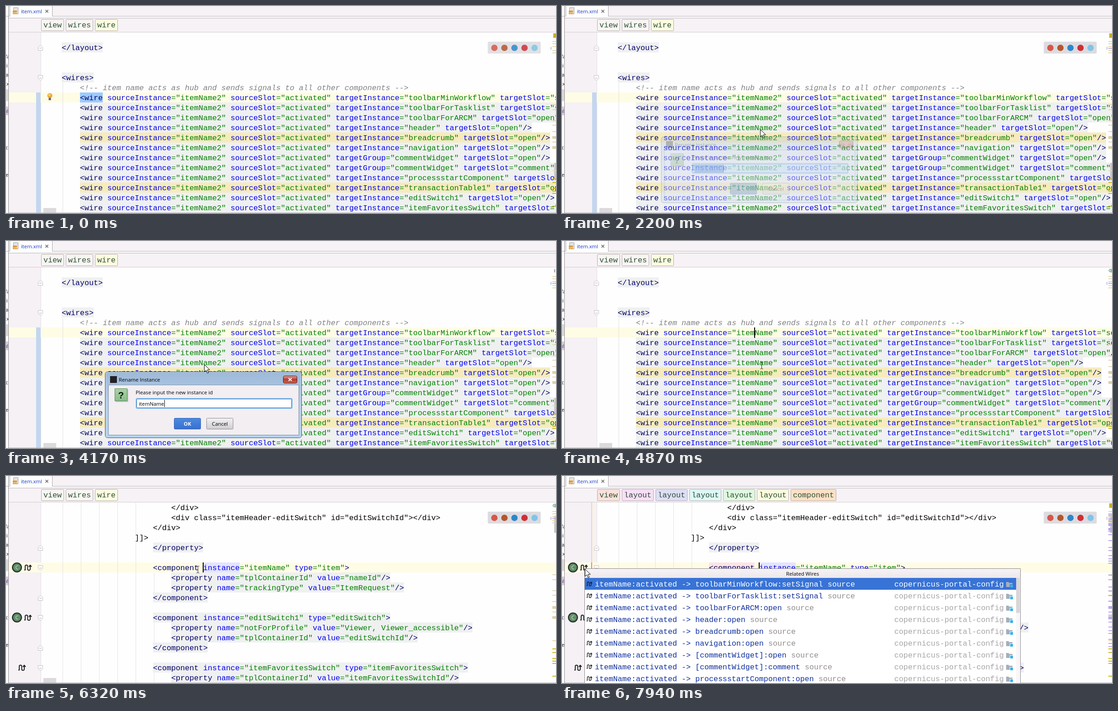
Recreate the animation shown at these times as an HTML page with a canvas. Size 1205 by 455 pixels, loop 8000 ms.

```html
<!DOCTYPE html>
<html lang="en">
<head>
<meta charset="utf-8">
<title>Rename instance</title>
<style>
html, body { margin: 0; width: 100%; height: 100%; overflow: hidden; background: #fefefe; }
canvas { display: block; }
</style>
</head>
<body>
<canvas id="stage" width="1205" height="455"></canvas>
<script>
const W = 1205, H = 455, LOOP = 8000, CHAR = 10, LINE = 22;
const c = document.getElementById('stage').getContext('2d');
const MONO = '16.667px "Liberation Mono", monospace';
const SANS = '11.3px "Open Sans", sans-serif';

const WIRES = [
  ['Instance', 'toolbarMinWorkflow', 'setSignal'], ['Instance', 'toolbarForTasklist', 'setSignal'],
  ['Instance', 'toolbarForARCM', 'open'], ['Instance', 'header', 'open'],
  ['Instance', 'breadcrumb', 'open'], ['Instance', 'navigation', 'open'],
  ['Group', 'commentWidget', 'open'], ['Group', 'commentWidget', 'comment'],
  ['Instance', 'processstartComponent', 'open'], ['Instance', 'transactionTable1', 'open'],
  ['Instance', 'editSwitch1', 'open'], ['Instance', 'itemFavoritesSwitch', 'open']
];

// [x, middle of line, markup]
const COMPONENTS = [
  [322, 158, '</property>'],
  [322, 202, '<component instance="itemName" type="item">'],
  [362, 224, '<property name="tplContainerId" value="nameId"/>'],
  [362, 246, '<property name="trackingType" value="ItemRequest"/>'],
  [322, 268, '</component>'],
  [322, 312, '<component instance="editSwitch1" type="editSwitch">'],
  [362, 334, '<property name="notForProfile" value="Viewer, Viewer_accessible"/>'],
  [362, 356, '<property name="tplContainerId" value="editSwitchId"/>'],
  [322, 378, '</component>'],
  [322, 422, '<component instance="itemFavoritesSwitch" type="itemFavoritesSwitch">'],
  [362, 444, '<property name="tplContainerId" value="itemFavoritesSwitchId"/>']
];

// [time, x, y] of the mouse
const MOUSE = [
  [0, -50, -50], [540, 925, 438], [700, 520, 290], [780, 396, 231], [940, 407, 217], [1020, 415, 207],
  [1180, 420, 205], [1420, 426, 225], [1500, 433, 244], [1730, 436, 262], [1810, 437, 273],
  [2200, 434, 271], [4640, 437, 273], [5300, 436, 271], [5530, 435, 256], [5610, 433, 240],
  [5770, 428, 225], [5850, 422, 210], [5930, 420, 205], [6580, 414, 206], [6720, 401, 209],
  [6870, 380, 218], [6950, 362, 223], [7110, 220, 220], [7190, 130, 216], [7270, 80, 214],
  [7350, 49, 212], [7510, 45, 206], [7670, 50, 204]
];

const step = (t, start, end, n) =>
  t < start ? 0 : t >= end ? 1 : (Math.floor((t - start) / (end - start) * (n - 1)) + 1) / n;

function rect(x, y, w, h, fill) {
  c.fillStyle = fill;
  c.fillRect(x, y, w, h);
}

function box(x, y, w, h, fill, border, radius = 0) {
  c.beginPath();
  c.roundRect(x + .5, y + .5, w - 1, h - 1, radius);
  c.fillStyle = fill;
  c.fill();
  if (border) stroke(border, 1);
}

function stroke(color, width) {
  c.strokeStyle = color;
  c.lineWidth = width;
  c.stroke();
}

function disc(x, y, r, fill) {
  c.beginPath();
  c.arc(x, y, r, 0, 7);
  c.fillStyle = fill;
  c.fill();
}

function gradient(y, h, ...colors) {
  const g = c.createLinearGradient(0, y, 0, y + h);
  colors.forEach((color, i) => g.addColorStop(i / (colors.length - 1), color));
  return g;
}

function text(s, x, baseline, color, font = MONO, align = 'left') {
  c.font = font;
  c.fillStyle = color;
  c.textAlign = align;
  c.fillText(s, x, baseline);
}

function path(d, x, y, scale, draw) {
  c.save();
  c.translate(x, y);
  c.scale(scale, scale);
  draw(new Path2D(d));
  c.restore();
}

function markup(s, x, mid) {
  for (const m of s.matchAll(/(<\/?\w+)|([\w-]+(?==))|(="[^"]*")|[^\s"]/g)) {
    const color = m[1] ? '#000068' : m[2] ? '#0000f0' : m[3] ? '#008000' : '#000068';
    text(m[0], x + m.index * CHAR, mid + 5, color);
  }
}

function tagLine(s, x, mid, back = '#eff0f0') {
  if (back) rect(x, mid - 12, s.length * CHAR, LINE, back);
  markup(s, x, mid);
}

function fold(mid, closes) {
  path(closes ? 'M0 11V4L5 0L10 4V11Z' : 'M0 0V7L5 11L10 7V0Z', 70.5, mid - 5.5, 1, p => {
    c.fillStyle = '#fff';
    c.fill(p);
    c.strokeStyle = '#c4c0c4';
    c.lineWidth = 1;
    c.stroke(p);
  });
  rect(73, mid, 5, 1, '#b0acb0');
}

function wireIcon(x, y, scale, color = '#222') {
  path('M0 12H2V4A2.5 2.5 0 0 1 7.5 4V10A2.5 2.5 0 0 0 13 10V2M10 5L13 1.5L16 5', x, y, scale, p => {
    c.strokeStyle = color;
    c.lineWidth = 2;
    c.stroke(p);
  });
}

function classIcon(mid) {
  disc(24, mid, 11, '#2c302c');
  disc(24, mid, 8.5, '#5f8f68');
  text('C', 24, mid + 4, '#e0ece0', '11px "Open Sans", sans-serif', 'center');
}

function bulb() {
  disc(96, 197, 5.5, '#eaa93a');
  disc(95, 195.5, 2.5, '#f8cf80');
  rect(93.5, 202, 5, 5, '#6c6458');
}

function frameChrome(t) {
  rect(0, 0, W, H, '#fefefe');
  rect(6, 0, W, 22, '#f7f2f6');
  rect(6, 27, W, 30, '#f7f2f6');
  rect(6, 58, 70, H, '#f6f1f5');
  rect(76, 58, 1, H, '#e2dee2');
  rect(0, 22, W, 1, '#b4b0b4');
  rect(6, 26, W, 1, '#b8b4b8');
  rect(6, 57, W, 1, '#d0ccd0');

  box(8, -3, 94, 26, '#fefefe', '#a8a4a8');
  rect(9, 22, 92, 1, '#fefefe');
  box(16, 3, 11, 15, '#e4e2e4', '#a0a0a8');
  rect(15, 10, 9, 8, '#d99a3c');
  text('</>', 15.5, 16.5, '#fff', 'bold 6px "Open Sans", sans-serif');
  text('item.xml', 33, 16, '#1638c8', SANS);
  c.beginPath();
  c.moveTo(86.5, 8.5); c.lineTo(92.5, 14.5);
  c.moveTo(92.5, 8.5); c.lineTo(86.5, 14.5);
  stroke('#686468', 1.6);

  // sliver of the project panel
  rect(0, 0, 5, H, '#fefefe');
  rect(0, 22, 5, 1, '#b4b0b4');
  rect(0, 183, 5, 26, '#dcdadc');
  rect(0, 221, 5, 19, '#d4d0d4');
  c.save();
  c.beginPath();
  c.rect(0, 0, 5, H);
  c.clip();
  [['fa', 115], ['li', 135], ['a', 155], ['.x', 175], ['ult', 235], ['c', 315], ['e', 375]].forEach(([s, y]) =>
    text(s, s === 'ult' ? -5 : s.length > 1 ? -2 : -1, y, s === 'ult' ? '#7030a0' : '#222', SANS));
  c.restore();
  rect(5, 0, 1, H, '#908c90');

  const crumbs = t < 6580
    ? [['view', '#f8f5f3'], ['wires', '#f8f5f3'], ['wire', '#fdfce0']]
    : [['view', '#fbe1db'], ['layout', '#f8def8'], ['layout', '#dedef6'], ['layout', '#def7f7'],
       ['layout', '#e0f8e0'], ['layout', '#fbfade'], ['component', '#fee0c5']];
  let x = 77;
  for (const [name, fill] of crumbs) {
    const w = name.length * CHAR + 10;
    box(x, 29, w, 26, fill, '#b4aca8', 1);
    text(name, x + 5, 47, '#2c5034');
    x += w + 4;
  }
}

function wiresView(t) {
  const renamed = t >= 4870;
  rect(124, 169, 1, H, '#e0e0e0');
  if (!renamed) rect(66, 190, 10, H, '#c3d6ef');
  fold(92, true);
  fold(158, false);
  tagLine('</layout>', 122, 92);
  tagLine('<wires>', 122, 158);
  text('<!-- item name acts as hub and sends signals to all other components -->', 162, 185, '#808080', 'italic ' + MONO);
  WIRES.forEach(([kind, target, slot], i) => {
    const line = `<wire sourceInstance="itemName${renamed ? '' : 2}" sourceSlot="activated" ` +
      `target${kind}="${target}" targetSlot="${slot}"/>`;
    if (!i && t < 1730) rect(162, 190, 50, LINE, '#9ccbff');
    tagLine(line, 162, 202 + i * LINE, !i ? null : i === 4 || i === 9 ? '#f6ebbc' : undefined);
  });
  if (t < 1180 || t >= 5770) bulb();
  if (t >= 1180 && t < 2200 || renamed) rect(421, 190, 2, 23, '#000');
}

function componentsView(t) {
  for (let x = 124; x <= 284; x += 40) rect(x, 58, 1, x === 284 ? 70 : H, '#e4e4e4');
  rect(284, 147, 1, H, '#e4e4e4');
  [[212, 44], [322, 44], [432, 22]].forEach(([y, h]) => rect(324, y, 1, h, '#e4e4e4'));
  if (t >= 7110) {
    rect(64, 58, 2, H, '#f0dc8c');
    rect(64, 190, 2, 22, '#e88070');
  }
  [158, 268, 378].forEach(y => fold(y, true));
  [202, 312, 422].forEach(y => fold(y, false));
  classIcon(201);
  classIcon(311);
  wireIcon(40, 194.5, 1);
  wireIcon(40, 304.5, 1);
  wireIcon(27, 414.5, 1);
  [['</div>', 362, 70], ['<div class="itemHeader-editSwitch" id="editSwitchId"></div>', 362, 92],
   ['</div>', 322, 114], [']]>', 282, 136]].forEach(([s, x, mid]) => text(s, x, mid + 5, '#000'));
  if (t >= 6580) rect(322, 190, 100, LINE, '#fde4e4');
  rect(432, 190, 80, LINE, '#e4e4ff');
  COMPONENTS.forEach(([x, mid, s]) => tagLine(s, x, mid, mid === 202 ? null : undefined));
  rect(431, 190, 2, LINE, '#000');
}

function errorStripe(t) {
  const marks = (ys, color, h = 2) => ys.forEach(y => rect(1197, y, 8, h, color));
  rect(1201, t < 6260 ? 345 : 87, 4, 38, '#c8c6ca');
  rect(1193, 90, 2, 6, '#b4c6e4');
  marks([77, 82, 88, 97, 102, 216, 227, 251, 261, 275, 298, 361], '#e6d8b0');
  marks([286, 308], '#e0d0a4', 6);
  if (t >= 1730) marks([92], '#c0a8e8');
  if (t >= 7110) {
    marks([83, 86, 92, 95, 99, 121, 128, 141, 156, 163, 174, 181, 186, 191, 217, 227, 243, 252, 262, 274,
      298, 305, 320, 331, 339, 345, 358, 367, 374], '#b8a8f4');
    marks([104, 114, 286, 309], '#b8a8f4', 6);
  }
  marks([379, 387, 400, 406, 411, 439], '#d0b818');
  if (t < 3440 || t >= 7110) rect(1199, 60, 6, 10, '#d0b010');
  else if (t < 4870) rect(1201, 62, 2, 7, '#989498');
  else {
    c.beginPath();
    c.ellipse(1203, 65, 4.5, 3, 0, 0, 7);
    stroke('#5aa07c', 1.5);
    disc(1203, 65, 1.5, '#4a906c');
  }
}

function browserBar(t) {
  c.globalAlpha =
    t < 1180 ? .85 - .65 * step(t, 70, 310, 4) :
    t < 1420 ? .35 :
    t < 3440 ? .35 + .65 * step(t, 1420, 1500, 2) :
    t < 5770 ? 1 - step(t, 3440, 3840, 5) :
    .5 * step(t, 5770, 6010, 4) + .5 * step(t, 6260, 6320, 2);
  box(1055, 78, 117, 27, '#dddbdf', null, 2);
  ['#d4584a', '#b4562e', '#2f86cc', '#cc3038', '#80c4e8'].forEach((color, i) => disc(1070 + i * 22, 92, 7, color));
  c.globalAlpha = 1;
}

function dialog(t) {
  c.globalAlpha = step(t, 2200, 2440, 4) - step(t, 4560, 4640, 2);
  box(217, 287, 431, 146, gradient(287, 146, '#9db9d8', '#b6cfe9', '#b4d0ee'), '#38444f', 5);
  box(218, 288, 429, 144, 'rgba(0,0,0,0)', '#d4e4f4', 4);
  box(224, 316, 418, 111, '#f2eef2', '#8094a8');
  rect(228, 297, 15, 15, '#222026');
  text('Rename Instance', 247, 309, '#000', SANS);

  box(607, 296, 31, 17, gradient(296, 17, '#e0a8a0', '#b83c34', '#c86850'), '#501c20', 3);
  c.beginPath();
  c.moveTo(619, 301.5); c.lineTo(626, 307.5);
  c.moveTo(626, 301.5); c.lineTo(619, 307.5);
  stroke('#fff', 2.2);

  rect(240, 326, 28, 28, '#c8c8c8');
  box(238, 324, 28, 28, gradient(324, 28, '#a8d4a4', '#88bc88'), '#5c8860');
  text('?', 252, 346, '#101810', 'bold 21px "Liberation Sans", sans-serif', 'center');
  text('Please input the new instance id', 284, 337, '#000', SANS);

  box(284, 345, 344, 24, '#74aee4', '#a4ccf0', 3);
  box(286, 347, 340, 20, '#fff', '#4c88c4', 1);
  const selected = t < 3440, value = t < 4170 ? 'itemName2' : 'itemName';
  if (selected) rect(290, 349, 64, 17, '#3a74c8');
  text(value, 291, 362, selected ? '#fff' : '#000', SANS);
  const caretOn = t < 2900 || t >= 3440 && t < 4020 || t >= 4170;
  if (caretOn) rect(t < 4170 ? 353 : 347, 349, 1, 16, '#000');

  box(368, 389, 59, 25, gradient(389, 25, '#4c8ae0', '#386fd0'), '#3464b4', 2);
  text('OK', 397.5, 406, '#fff', 'bold ' + SANS, 'center');
  box(439, 389, 59, 25, gradient(389, 25, '#f4f2f4', '#cfcdcf'), '#8c8a8c', 2);
  text('Cancel', 468.5, 406, '#000', SANS, 'center');
  c.globalAlpha = 1;
}

function relatedWires() {
  box(49, 203, 956, 260, '#fff', '#8c888c');
  rect(50, 204, 954, 20, gradient(204, 20, '#f6f2f6', '#ece8ec'));
  text('Related Wires', 527, 219, '#000', SANS, 'center');
  rect(50, 224, 945, 26, '#3873d6');
  rect(995, 224, 9, 231, '#f8f6f8');
  rect(995, 224, 8, 77, '#d8d6d8');
  WIRES.slice(0, 9).forEach(([kind, target, slot], i) => {
    const mid = 238 + i * 26, pick = (normal) => i ? normal : '#fff';
    const label = `itemName:activated -> ${kind === 'Group' ? `[${target}]` : target}:${slot}`;
    wireIcon(54, mid - 6, .75, i ? '#222' : '#0c1c40');
    text(label, 72, mid + 5, pick('#10309c'));
    text('source', 72 + (label.length + 1) * CHAR, mid + 5, pick('#948c8c'));
    text('copernicus-portal-config', 728, mid + 5, pick('#a8a4a8'));
    rect(973, mid - 5, 6, 3, '#a4b0bc');
    rect(973, mid - 3, 14, 9, '#a4b0bc');
    rect(981, mid, 8, 7, i ? '#fff' : '#3873d6');
    rect(982, mid + 1, 6, 6, '#38b0e8');
  });
}

function mouse(t) {
  const [, x, y] = MOUSE.findLast(k => k[0] <= t);
  if (t >= 2200 && t < 4640 || t >= 7350) {
    path('M0 0V16L4 12.5L6.7 19L9.3 18L6.6 11.6H11.8Z', x + .5, y + .5, 1, p => {
      c.fillStyle = '#fff';
      c.fill(p);
      c.strokeStyle = '#000';
      c.lineWidth = 1;
      c.stroke(p);
    });
  } else {
    path('M-3 -7.5H-1L0 -6.5L1 -7.5H3M0 -6.5V6.5M-3 7.5H-1L0 6.5L1 7.5H3', x + .5, y + .5, 1, p => {
      c.strokeStyle = '#222';
      c.lineWidth = 1;
      c.stroke(p);
    });
  }
}

function draw(t) {
  frameChrome(t);
  rect(6, 190, W, LINE, '#fefce5');
  c.save();
  c.beginPath();
  c.rect(6, 58, W, H);
  c.clip();
  (t < 6260 ? wiresView : componentsView)(t);
  c.restore();
  rect(82, 444, 28, 10, '#dcdadc');
  errorStripe(t);
  browserBar(t);
  rect(6, 454, W, 1, '#c0bcc0');
  if (t >= 2200 && t < 4640) dialog(t);
  if (t >= 7940) relatedWires();
  mouse(t);
}

const start = performance.now();
(function tick() {
  draw((performance.now() - start) % LOOP);
  requestAnimationFrame(tick);
})();
</script>
</body>
</html>
```
